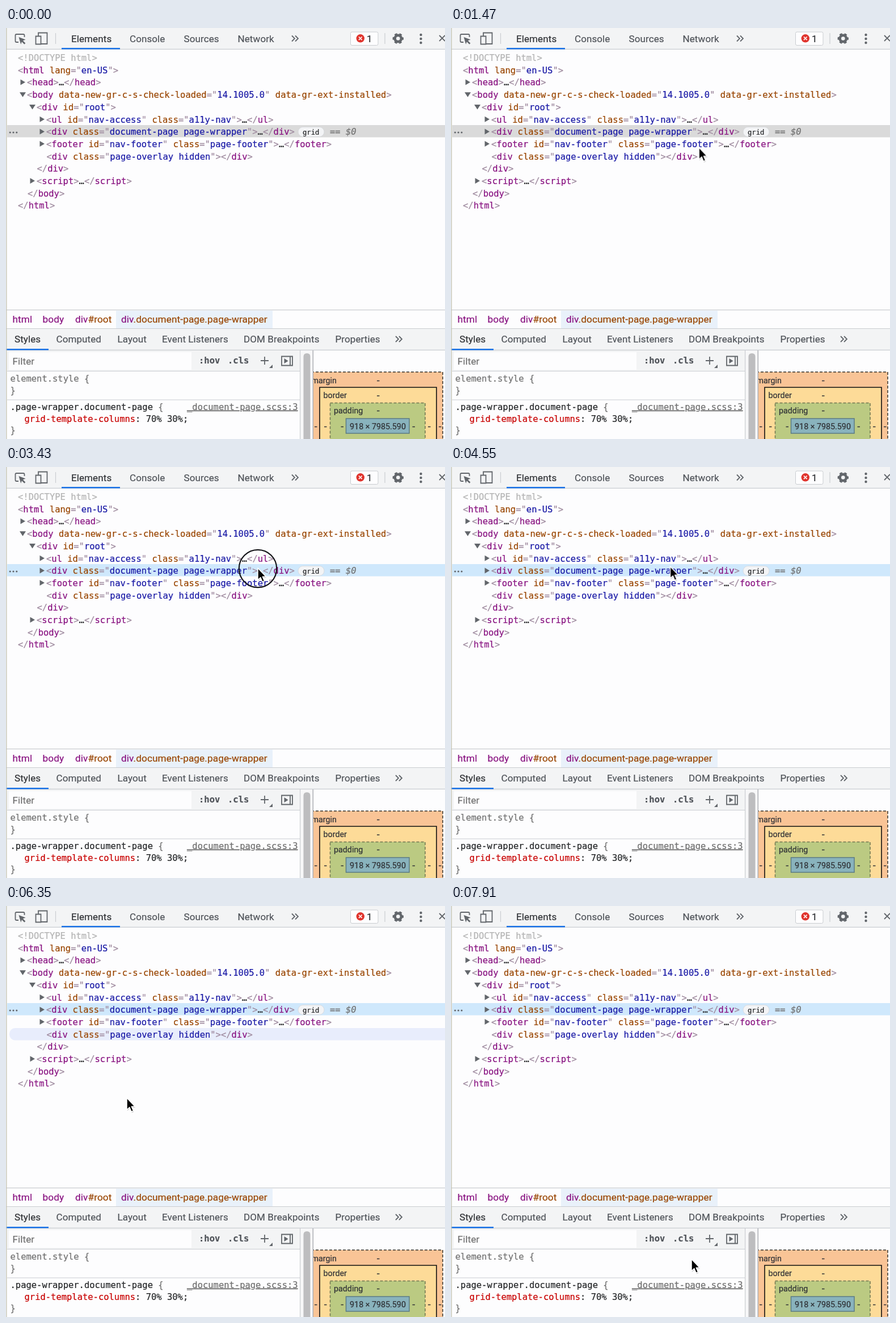
Animation of 774x724 px, one loop 8000 ms. Source, as an HTML page:

```html
<!DOCTYPE html>
<html lang="en">
<head>
<meta charset="utf-8">
<title>Element inspector</title>
<style>
  html, body { margin: 0; width: 100%; height: 100%; overflow: hidden; background: #fdfdfe; }
  svg { display: block; width: 774px; height: 724px; }
  text, tspan { fill: currentColor; stroke: currentColor; stroke-width: .22; white-space: pre; }
  .ui { font: 17px Roboto, sans-serif; letter-spacing: .1px; color: #50545a; }
  .crumbs { font-size: 17.2px; }
  .on { color: #303236; }
  .box { font: 14.3px Roboto, sans-serif; color: #303236; }
  .mono { font: 15.47px "DejaVu Sans Mono", monospace; color: #242628; }
  .bold { font-weight: bold; color: #50545a; }
  .dim { color: #707070; }
  .faint { color: #b4b4b4; }
  .tag { color: #881280; }
  .attr { color: #994500; }
  .val { color: #1a1aa6; }
  .punct { color: #a08ca0; }
  .prop { color: #c80000; }
  .icon { fill: none; stroke: #62666b; stroke-width: 1.8; }
  .solid { fill: #62666b; }
  .line { stroke: #cacdd1; stroke-width: 1.2; }
  .blue { fill: #1a73e8; }

  #selected { animation: select 8s step-end infinite; }
  #ring { animation: press 8s step-end infinite; }
  #hoverFooter { animation: passFooter 8s step-end infinite; }
  #hoverOverlay { animation: passOverlay 8s step-end infinite; }
  #cursor { animation: travel 8s ease-in-out infinite; }

  @keyframes select { 0% { fill: #dadada; } 42.375%, 100% { fill: #cfe8fc; } }
  @keyframes press { 0%, 100% { opacity: 0; } 42.375% { opacity: 1; } 45.5% { opacity: 0; } }
  @keyframes passFooter { 0%, 100% { opacity: 0; } 73.3% { opacity: 1; } 74.4% { opacity: 0; } }
  @keyframes passOverlay { 0%, 100% { opacity: 0; } 74.4% { opacity: 1; } 85% { opacity: 0; } }
  @keyframes travel {
    0%, 4% { transform: translate(-30px, 300px); }
    10.4%, 13% { transform: translate(431px, 228px); }
    27%, 30% { transform: translate(451px, 171px); }
    41.5%, 46% { transform: translate(444px, 178px); }
    66%, 69% { transform: translate(344px, 173px); }
    78.5%, 83% { transform: translate(213px, 338px); }
    96%, 100% { transform: translate(424px, 622px); }
  }
</style>
</head>
<body>
<svg viewBox="0 0 774 724">
  <!-- toolbar -->
  <path fill="#f3f4f5" d="M0 0H774V37H0Z"/>
  <path class="line" d="M0 37.4H774M87.5 9V28M668 9V28"/>
  <path class="blue" d="M98 35H201V37.6H98Z"/>
  <path class="icon" d="M22 25H18.5Q16.5 25 16.5 23V13Q16.5 11 18.5 11H30.5Q32.5 11 32.5 13V16"/>
  <path class="solid" d="M22.5 16L34.5 20.6 29.8 22.2 34.3 26.8 32.4 28.7 27.9 24.2 26.2 28.8Z"/>
  <path class="icon" d="M57 14V8.5H72.5V28H62M52.5 14.5H61.5V28.5H52.5Z"/>
  <g class="ui">
    <text class="on" x="115" y="25">Elements</text>
    <text x="218" y="25">Console</text>
    <text x="313.5" y="25">Sources</text>
    <text x="408.5" y="25">Network</text>
  </g>
  <path class="icon" d="M504 13.5L509 18.5 504 23.5M510 13.5L515 18.5 510 23.5"/>
  <rect x="607.5" y="7" width="48.5" height="23.5" rx="2.5" fill="#fdfdfe" stroke="#cacdd1"/>
  <circle cx="624.8" cy="18.3" r="7.2" fill="#e0332c"/>
  <path stroke="#fff" stroke-width="1.7" d="M622 15.5L627.6 21.1M627.6 15.5L622 21.1"/>
  <text class="ui on" x="636" y="24.5">1</text>
  <g transform="translate(691.3 18.5)">
    <circle r="5.6" fill="none" stroke="#62666b" stroke-width="4.6"/>
    <circle r="8.2" fill="none" stroke="#62666b" stroke-width="3" stroke-dasharray="4.6 3.99" stroke-dashoffset="2.3"/>
  </g>
  <g class="solid">
    <circle cx="731.5" cy="12" r="2.2"/><circle cx="731.5" cy="19" r="2.2"/><circle cx="731.5" cy="26" r="2.2"/>
  </g>
  <path class="icon" d="M764 13L774 23M764 23L774 13"/>

  <!-- element tree -->
  <rect id="selected" x="2" y="171" width="772" height="21.5"/>
  <rect id="hoverFooter" x="6" y="193" width="780" height="21.5" rx="10" fill="#e8edfc"/>
  <rect id="hoverOverlay" x="6" y="215" width="780" height="21.5" rx="10" fill="#e8edfc"/>
  <g id="tree" class="mono"></g>
  <g class="solid">
    <circle cx="7.2" cy="184" r="1.6"/><circle cx="13" cy="184" r="1.6"/><circle cx="18.8" cy="184" r="1.6"/>
  </g>
  <rect x="515" y="174.5" width="46" height="17" rx="8.5" fill="#f3f4f6" stroke="#d3d6da" stroke-width=".8"/>
  <text class="mono" x="523" y="187.5" style="font-size:12.2px">grid</text>
  <text class="mono dim" x="571" y="188" style="font-style:italic">== $0</text>

  <!-- breadcrumbs -->
  <path fill="#e9f1fa" d="M194 498H470V529H194Z"/>
  <path class="line" d="M0 496.7H774M0 529.5H774"/>
  <g class="ui crumbs">
    <text class="tag" x="11.5" y="519.3">html</text>
    <text class="tag" x="64.5" y="519.3">body</text>
    <text class="tag" x="122" y="519.3">div<tspan class="attr">#root</tspan></text>
    <text class="tag" x="203" y="519.3">div<tspan class="attr">.document-page.page-wrapper</tspan></text>
  </g>

  <!-- sidebar tabs -->
  <path fill="#f3f4f5" d="M0 530H774V567H0Z"/>
  <path class="line" d="M0 567.4H774"/>
  <path class="blue" d="M0 565H75V567.6H0Z"/>
  <g class="ui">
    <text class="on" x="15" y="554">Styles</text>
    <text x="88.5" y="554">Computed</text>
    <text x="196.5" y="554">Layout</text>
    <text x="275" y="554">Event Listeners</text>
    <text x="419" y="554">DOM Breakpoints</text>
    <text x="580.5" y="554">Properties</text>
  </g>
  <path class="icon" d="M687 543L692 548 687 553M693 543L698 548 693 553"/>

  <!-- style rules -->
  <path fill="#f3f4f5" d="M2 568H518V604H2Z"/>
  <path fill="#fdfdfe" d="M5 571H327V602H5Z"/>
  <text class="ui dim" x="11.5" y="593">Filter</text>
  <text class="mono bold" x="340" y="591">:hov</text>
  <text class="mono bold" x="391" y="591">.cls</text>
  <path class="icon" d="M449 586H463M456 579V593"/>
  <path class="solid" d="M470 593V599H464Z"/>
  <path class="icon" d="M486 578.5H505V594.5H486ZM501 578.5V594.5"/>
  <path class="solid" d="M490.5 582L497.5 586.5 490.5 591Z"/>
  <path class="line" d="M2 604.5H518M2 655H518"/>
  <g class="mono">
    <text class="dim" x="7.5" y="622.5">element.style {</text>
    <text class="dim" x="7.5" y="643.5">}</text>
    <text x="7.5" y="672.5">.page-wrapper.document-page <tspan class="dim">{</tspan></text>
    <text class="dim" x="319" y="672.5" text-decoration="underline">_document-page.scss:3</text>
    <text x="32.5" y="694"><tspan class="prop">grid-template-columns</tspan>: 70% 30%;</text>
    <text class="dim" x="7.5" y="714">}</text>
  </g>
  <path fill="#f7f7f8" d="M519 568H541V724H519Z"/>
  <path class="line" d="M518.6 568V724"/>
  <path fill="#bdbdbf" d="M524.5 724V579Q524.5 573 530.5 573T536.5 579V724Z"/>
  <path stroke="#a9abb0" stroke-width="1.4" d="M541.3 568V724"/>

  <!-- box model -->
  <svg x="542" y="568" width="232" height="156" style="width:232px;height:156px" viewBox="542 568 232 156">
    <path fill="#f9c496" stroke="#36332d" stroke-width="1.5" stroke-dasharray="5 3" d="M530 606H770V740H530Z"/>
    <path fill="#fddb98" stroke="#111" stroke-width="1.6" d="M553 633H759V740H553Z"/>
    <path fill="#bbca82" stroke="#707650" stroke-width="1.5" stroke-dasharray="5 3" d="M571.5 660.5H739V740H571.5Z"/>
    <path fill="#89b3bd" stroke="#5b7b85" stroke-width="1.5" d="M599.5 688H711V714H599.5Z"/>
    <g class="box">
      <text x="538.5" y="626">margin</text>
      <text x="559.5" y="652">border</text>
      <text x="578" y="679">padding</text>
      <text x="655.5" y="707" text-anchor="middle">918 × 7985.590</text>
    </g>
    <path stroke="#303236" stroke-width="1.4" d="M654 621.5H658.5M654 648H658.5M654 674.5H658.5M544 702.5H548.5M561 702.5H565.5M590.5 702.5H595M716.5 702.5H721M744 702.5H748.5M763 702.5H767.5"/>
  </svg>
  <path stroke="#c9c8b8" stroke-width="1.4" d="M.8 0V724"/>

  <!-- pointer -->
  <circle id="ring" cx="444" cy="179" r="33.2" fill="none" stroke="#16161a" stroke-width="2.2"/>
  <g id="cursor">
    <path fill="#000" opacity=".18" transform="translate(.8 2)" d="M0 0V21L4.8 16.6 8 24.3 11.6 22.8 8.3 15.2H14.4Z"/>
    <path stroke="#fff" stroke-width="1.5" stroke-linejoin="round" d="M0 0V21L4.8 16.6 8 24.3 11.6 22.8 8.3 15.2H14.4Z"/>
  </g>
</svg>
<script>
  const rows = [
    [21, '', '<!DOCTYPE html>'],
    [21, '', '<html lang="en-US">'],
    [37, 'closed', '<head>…</head>'],
    [37, 'open', '<body data-new-gr-c-s-check-loaded="14.1005.0" data-gr-ext-installed>'],
    [54, 'open', '<div id="root">'],
    [71, 'closed', '<ul id="nav-access" class="a11y-nav">…</ul>'],
    [71, 'closed', '<div class="document-page page-wrapper">…</div>'],
    [71, 'closed', '<footer id="nav-footer" class="page-footer">…</footer>'],
    [71.5, '', '<div class="page-overlay hidden"></div>'],
    [54.5, '', '</div>'],
    [54, 'closed', '<script>…<\/script>'],
    [38, '', '</body>'],
    [21, '', '</html>'],
  ];
  const arrows = {
    closed: 'M-11.5 -5L-3 0 -11.5 5Z',
    open: 'M-13 -4H-2L-7.5 4.5Z',
  };
  const escape = s => s.replace(/</g, '&lt;').replace(/>/g, '&gt;');
  const span = (kind, s) => `<tspan class="${kind}">${escape(s)}</tspan>`;
  const token = /((?<=<\/?)\w+)|((?<=")[^"=<>]+(?="))|([\w-]+(?=[=>]))|([<>\/="]+)/g;

  function paint(markup) {
    if (markup.startsWith('<!')) return span('faint', markup);
    return markup.replace(token, (all, tag, val, attr) =>
      span(tag ? 'tag' : val ? 'val' : attr ? 'attr' : 'punct', all));
  }

  document.getElementById('tree').innerHTML = rows.map(([x, arrow, markup], i) => {
    const y = 58 + 21.7 * i;
    const mark = arrow ? `<path class="solid" transform="translate(${x} ${y - 5.8})" d="${arrows[arrow]}"/>` : '';
    return `${mark}<text x="${x}" y="${y}">${paint(markup)}</text>`;
  }).join('');
</script>
</body>
</html>
```
